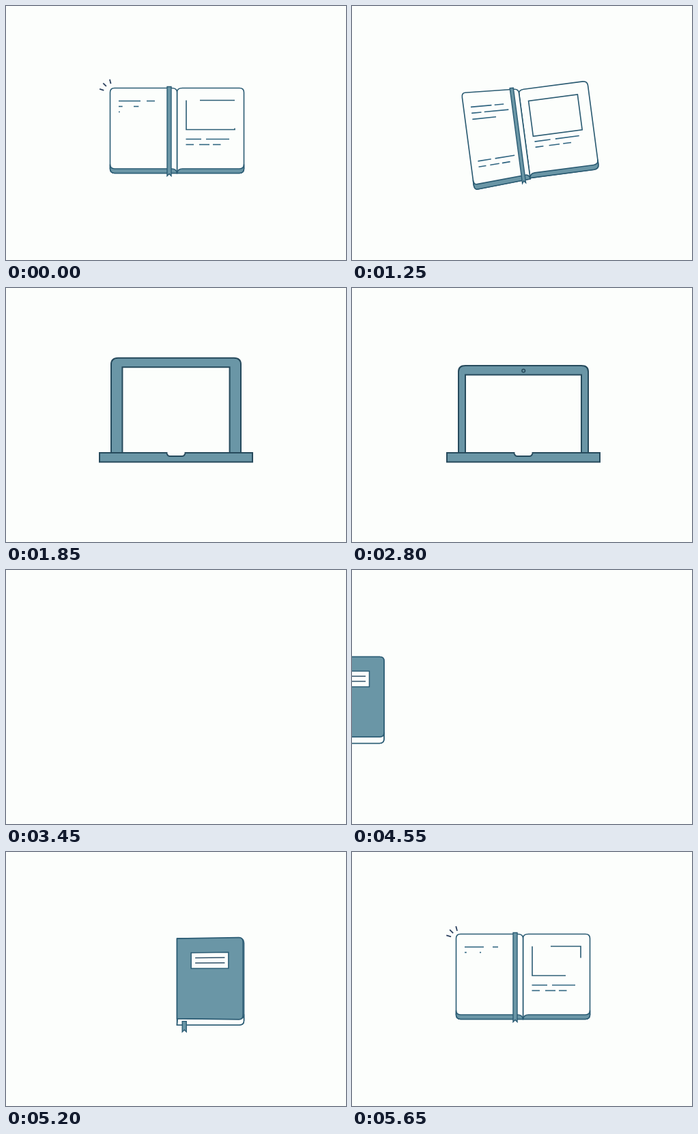
These frames come from a looping animation (498 by 373 pixels, 5700 ms). An HTML page:

```html
<!DOCTYPE html>
<html lang="en">
<head>
<meta charset="utf-8">
<title>Notebook and laptop</title>
<style>
html, body { margin: 0; width: 100%; height: 100%; overflow: hidden; background: #fcfefc; }
svg { display: block; width: 100vw; height: 100vh; }
</style>
</head>
<body>
<svg id="stage" viewBox="0 0 498 373" fill="none"></svg>
<script>
const LOOP = 5700, STEP = 50;
const WHITE = [252, 254, 252], TEAL = [106, 150, 166], INK = [43, 92, 116], DARK = [38, 74, 92];
const stage = document.getElementById('stage');

const clamp = v => Math.max(0, Math.min(1, v));
const lerp = (a, b, k) => a + (b - a) * k;
const ramp = (v, a, b) => clamp((v - a) / (b - a));
const smooth = k => k * k * (3 - 2 * k);
const mix = (a, b, k) => `rgb(${a.map((v, i) => Math.round(lerp(v, b[i], k)))})`;
const paint = c => mix(c, c, 0);

// Maps page coordinates (0..98 away from the spine, -62.5..62.5 along it) to the stage.
function mapper(side, depth, inner, outer, angle, cx, cy) {
  const c = Math.cos(angle), s = Math.sin(angle);
  return (x, y) => {
    const k = x / 98, X = side * k * depth, Y = y / 62.5 * lerp(inner, outer, k);
    return [cx + c * X - s * Y, cy + s * X + c * Y];
  };
}

function shape(map, d, fill, stroke, width, extra = '') {
  const path = d.replace(/(-?[\d.]+),(-?[\d.]+)/g, (m, x, y) =>
    map(+x, +y).map(v => v.toFixed(2)).join(' '));
  return `<path d="${path}" fill="${fill}" stroke="${stroke}" stroke-width="${width}" ${extra}/>`;
}

const flat = (x, y) => [x, y];
const box = (x, y, X, Y) => `M${x},${y}L${x},${Y}L${X},${Y}L${X},${y}Z`;
const shift = (x, y, body) => `<g transform="translate(${x.toFixed(2)} ${y.toFixed(2)})">${body}</g>`;

function page(map, o = {}) {
  const { bottom = 62.5, strip = 6.5, curl = 8, r = 6.5, fill = paint(WHITE),
    edge = paint(TEAL), ink = paint(INK), width = 1.6 } = o;
  const out = 98 - r, low = bottom - strip;
  let s = shape(map, `M0,${-62.5 + curl * .75}Q0,-62.5 ${curl},-62.5L${out},-62.5Q98,-62.5 98,${-62.5 + r}` +
    `L98,${bottom - r}Q98,${bottom} ${out},${bottom}L0,${bottom}Z`, fill, ink, width);
  if (strip > .3)
    s += shape(map, `M98,${low - r}Q98,${low} ${out},${low}L${curl},${low}Q1,${low} 0,${bottom}` +
      `L${out},${bottom}Q98,${bottom} 98,${bottom - r}Z`, edge, ink, width);
  return s;
}

// side, y, from, to, first step, steps
const TEXT = [
  [-1, 139.5, 165, 201, -7, 9], [-1, 139.5, 206, 222, -2, 4],
  [-1, 147.5, 165, 182, -1, 6], [-1, 147.5, 187, 229, -.4, 8],
  [-1, 155.5, 165, 206, .6, 9],
  [-1, 210, 165, 188, 2, 6], [-1, 210, 195, 229, 4, 8],
  [-1, 217.5, 165, 178, 5, 6], [-1, 217.5, 185, 201, 7, 6], [-1, 217.5, 206, 220, 9, 5],
  [1, 195.5, 263.5, 286, -8, 4], [1, 195.5, 293, 327, -7, 5],
  [1, 203.5, 263.5, 275, -6, 3], [1, 203.5, 283, 298, -6, 4], [1, 203.5, 303, 314.5, -5, 4]
];

function text(side, map, n, keep = 1) {
  return TEXT.filter(l => l[0] === side).map(([, y, a, b, start, steps]) => {
    const k = ramp(n, start, start + steps) * keep;
    if (!k) return '';
    const at = x => Math.abs(x - 250.5), Y = y - 183;
    return shape(map, `M${at(a)},${Y}L${at(lerp(a, b, k))},${Y}`, 'none', '#2f6480', 1.6);
  }).join('');
}

function ribbon(map, x, top, end) {
  return shape(map, `M${x},${top}L${x + 6},${top}L${x + 6},${end}L${x + 3},${end - 3}L${x},${end}Z`,
    paint(TEAL), paint(INK), 1.4);
}

// Picture box drawn by two growing strokes, anticlockwise from its top left corner.
function picture(map, n) {
  const a = Math.max(0, 92 + 24 * n), b = Math.max(a, 140 + 17 * n), c = Math.max(b, 201 + 7 * n);
  if (n < -4) return '';
  const dash = n > 4 ? '' : `stroke-dasharray="${a} ${b - a} ${Math.min(c, 228) - b} 999"`;
  return shape(map, box(13.5, -44.5, 84.5, -1.5), 'none', paint(INK), 1.6, dash);
}

function sparks(n) {
  if (n < -2 || n > 2.5) return '';
  const near = 12.5 + 1.8 * n + (n > 1 ? 2 : 0), far = 19.6 + 1.2 * n;
  return [-163, -135, -104].map(deg => {
    const c = Math.cos(deg * Math.PI / 180), s = Math.sin(deg * Math.PI / 180);
    return shape(flat, `M${157 + c * near},${128 + s * near}L${157 + c * far},${128 + s * far}`,
      'none', '#2c4260', 1.8);
  }).join('');
}

function cover(map) {
  const ink = paint(INK);
  return shape(map, 'M0,-62.5L92,-62.5Q98,-62.5 98,-56.5L98,49Q98,55 92,55L0,55Z', paint(TEAL), ink, 1.6) +
    shape(map, box(21, -41.5, 76.5, -18.5), paint(WHITE), ink, 1.5) +
    shape(map, 'M27,-34L71,-34M27,-26.5L71,-26.5', 'none', '#2f5068', 1.5);
}

// open: 0 closed, 1 lying open
function book(open, n) {
  const turn = Math.cos(open * Math.PI), lift = Math.sin(open * Math.PI) * 9;
  const right = mapper(1, 98, 62.5, 62.5, 0, 250.5, 183);
  const leaf = mapper(Math.sign(turn) || 1, 98 * Math.abs(turn), 62.5, 62.5 + lift, 0, 250.5, 183);
  const strap = ribbon((x, y) => [x + 250.5, y + 183], lerp(9, -14.5, open),
    open < .1 ? 59 : -64.5, lerp(75, 66.5, open));
  let s = page(right, {
    bottom: lerp(64.5, 62.5, open), strip: lerp(9.5, 6.5, open),
    curl: 8 * open, edge: mix(WHITE, TEAL, ramp(open, .2, .8))
  });
  s += picture(right, n) + text(1, right, n);
  s += turn > 0 ? strap + cover(leaf) : page(leaf) + text(-1, leaf, n) + strap;
  return shift(0, 7 * (1 - open), s) + sparks(n);
}

// p: 0 open book, 1 laptop; q: settling of the lid
function laptop(p, q) {
  const angle = -Math.PI / 2 * p, bump = Math.sin(Math.PI * p);
  const cx = lerp(250.5, 249, p) + 8 * bump, cy = lerp(183, 242, p);
  const depth = lerp(98, 141, p) - 13 * q, half = lerp(62.5, 95, p);
  const lid = mapper(1, depth, half, half, angle, cx, cy);
  const base = mapper(-1, 13.5 + 84.5 * Math.pow(1 - p, 2.2), lerp(62.5, 112, p),
    lerp(62.5, 112, p) + 39 * Math.pow(Math.max(0, bump), 1.5), angle, cx, cy);
  const tint = ramp(p, .15, .7), keep = 1 - ramp(p, .15, .5);
  const o = {
    strip: 6.5 * (1 - ramp(p, .1, .6)), curl: 8 * (1 - p), r: 6.7,
    fill: mix(WHITE, TEAL, tint), ink: mix(INK, DARK, p), width: lerp(1.6, 2, p)
  };
  const bezel = lerp(17.5, 10, q), unit = 98 / depth, across = 62.5 / half;
  const screen = box(lerp(13.5, 0, p) * unit, lerp(-44.5, bezel - 95, p) * across,
    lerp(84.5, depth - 13.5, p) * unit, lerp(-1.5, 95 - bezel, p) * across);
  let s = page(lid, o) + shape(lid, screen, paint(WHITE), o.ink, o.width) + text(1, lid, 99, keep);
  s += page(base, { ...o, r: 6.5 * (1 - p) }) + text(-1, base, 99, keep);
  if (keep) s += ribbon(base, 8.5, -64.5 * keep, 66.5 * keep);
  if (p === 1) {
    s += shape(flat, 'M235.5,242L236,244Q237,247 240,247L258,247Q261,247 262,244L262.5,242',
      paint(WHITE), o.ink, 2);
    s += shape(flat, 'M236.5,241.5L261.5,241.5', 'none', paint(WHITE), 2.4);
    const r = 2.3 * ramp(q, .2, .9);
    if (r) s += `<circle cx="249.2" cy="${(242 - depth + 7.5).toFixed(2)}" r="${r.toFixed(2)}" ` +
      `fill="${paint(TEAL)}" stroke="${o.ink}" stroke-width="1.5"/>`;
  }
  return s;
}

function trails(a, b) {
  return b - a < 1 ? '' :
    shape(flat, `M${a},150.5L${b},150.5M${a},234L${b},234`, 'none', '#2f5470', 2);
}

function scene(t) {
  if (t < 1250) return book(1, t / STEP + 1);
  if (t < 2800) return laptop(ramp(t, 1200, 1800), ramp(t, 1800, 2150));
  if (t < 3450) {
    const n = (t - 2750) / STEP, x = 2 * Math.pow(n, 2.4);
    const lines = n < 5 ? '' : trails(150 + 40 * (n - 5), Math.min(477, 117 + x));
    return (x < 365 ? shift(x, 0, laptop(1, 1)) : '') + lines;
  }
  if (t < 4550) return '';
  if (t < 5200) {
    const n = (t - 4500) / STEP, x = -421 * Math.pow(1 - clamp(n / 11), 3.5);
    return trails(n < 5 ? -5 : 12 * (n - 4), Math.min(29.5, 230 + x)) + shift(x, 0, book(0, -99));
  }
  return book(smooth(ramp(t, 5150, 5500)), (t - 5650) / STEP);
}

let start = null, last = -1;
function frame(now) {
  if (start === null) start = now;
  const t = Math.floor(((now - start) % LOOP + .01) / STEP) * STEP % LOOP;
  if (t !== last) stage.innerHTML = scene(last = t);
  requestAnimationFrame(frame);
}
stage.innerHTML = scene(0);
requestAnimationFrame(frame);
</script>
</body>
</html>
```
